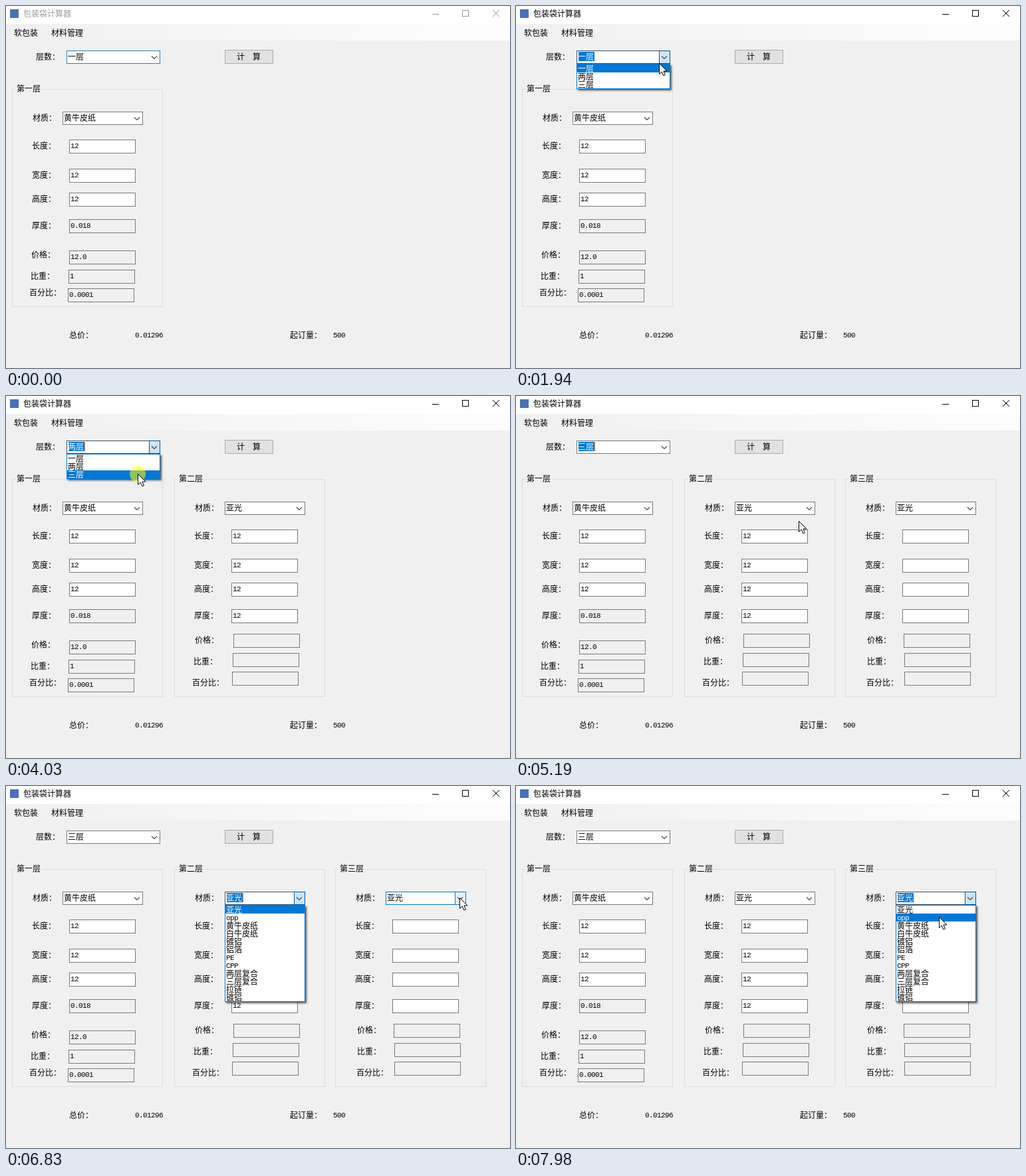
An HTML page with a canvas for the animation above (8000 ms loop, 758 by 545 pixels).

```html
<!DOCTYPE html>
<html lang="zh-CN">
<head>
<meta charset="utf-8">
<title>包装袋计算器</title>
<style>
html, body { margin: 0; width: 100%; height: 100%; overflow: hidden; background: #f0f0f0; }
canvas { display: block; }
</style>
</head>
<body>
<canvas id="stage" width="758" height="545"></canvas>
<script>
const ctx = document.getElementById('stage').getContext('2d');
const LOOP = 8000, SLIDE = 140, ROW = 12;
const BLUE = '#0078d7', GRAY = '#7a7a7a', FACE = '#f0f0f0';
const LAYERS = ['一层', '两层', '三层'];
const MATERIALS = ['亚光', 'opp', '黄牛皮纸', '白牛皮纸', '镀铝', '铝箔', 'PE', 'CPP',
  '两层复合', '三层复合', '拉链', '镀铝'];

// Moments of the story, in ms
const ACTIVATE = 1320, PICK_TWO = 2400, PICK_THREE = 4110, FOCUS_2 = 5570, FOCUS_3 = 7290;
const PRESSES = [[1250, 1400], [2320, 2400], [3180, 3330], [3960, 4110],
  [5570, 5720], [6880, 7060], [7290, 7340]];
const CARET_RESETS = [ACTIVATE, PICK_TWO, 3960, FOCUS_2, FOCUS_3];

const layerCombo = { x: 91, y: 67, w: 141, items: LAYERS, opens: [[1400, PICK_TWO], [3250, PICK_THREE]],
  focus: [ACTIVATE, FOCUS_2],
  value: t => LAYERS[t < PICK_TWO ? 0 : t < PICK_THREE ? 1 : 2] };
const materialCombo = (x, value, opens = [], focus = [LOOP, LOOP]) =>
  ({ x, y: 159, w: 121, items: MATERIALS, opens, focus, value: () => value });

const groups = [
  { x: 9, title: '第一层', from: 0, combo: materialCombo(85, '黄牛皮纸'),
    values: ['12', '12', '12', '0.018'], locked: true,
    results: [['价格', 38, 374, 95, 368, '12.0'], ['比重', 37, 406, 94, 397, '1'], ['百分比', 35, 431, 93, 425, '0.0001']] },
  { x: 253, title: '第二层', from: PICK_TWO, combo: materialCombo(329, '亚光', [[5650, 6900]], [FOCUS_2, FOCUS_3]),
    values: ['12', '12', '12', '12'],
    results: [['价格', 284, 367, 342, 358, ''], ['比重', 282, 399, 341, 387, ''], ['百分比', 280, 431, 340, 415, '']] },
  { x: 495, title: '第三层', from: PICK_THREE, combo: materialCombo(571, '亚光', [[7290, LOOP]], [FOCUS_3, LOOP]),
    values: ['', '', '', ''],
    results: [['价格', 528, 367, 583, 358, ''], ['比重', 528, 399, 584, 387, ''], ['百分比', 527, 431, 584, 415, '']] }
];

// Pointer path: time, x, y
const PATH = [
  [320, 618, 515], [1080, 211, 84], [1170, 211, 84], [1250, 222, 78], [1780, 222, 78],
  [1940, 215, 86], [2170, 205, 103], [2400, 205, 103], [2630, 212, 84], [2780, 212, 84],
  [2860, 212, 82], [3010, 217, 80], [3100, 217, 80], [3180, 223, 77], [3480, 223, 77],
  [3790, 198, 117], [4150, 198, 117], [4720, 240, 150], [5300, 444, 192], [5570, 441, 175],
  [6130, 441, 175], [6860, 683, 168], [7440, 683, 168], [7980, 636, 197], [LOOP, 636, 197]
];

const within = (t, [a, b]) => t >= a && t < b;

function pointerAt(t) {
  const i = PATH.findIndex(p => p[0] > t);
  if (i < 1) return null;
  const [t0, x0, y0] = PATH[i - 1], [t1, x1, y1] = PATH[i];
  const u = (t - t0) / (t1 - t0), e = u * u * (3 - 2 * u);
  return { x: Math.round(x0 + (x1 - x0) * e), y: Math.round(y0 + (y1 - y0) * e) };
}

function fill(x, y, w, h, color) {
  ctx.fillStyle = color;
  ctx.fillRect(x, y, w, h);
}

function box(x, y, w, h, face, edge) {
  fill(x, y, w, h, edge);
  fill(x + 1, y + 1, w - 2, h - 2, face);
}

function line(color, width, ...points) {
  ctx.strokeStyle = color;
  ctx.lineWidth = width;
  ctx.beginPath();
  points.forEach(([x, y]) => ctx.lineTo(x, y));
  ctx.stroke();
}

// Text is placed by its left edge and vertical middle
function text(s, x, cy, color = '#000') {
  const latin = /^[\x20-\x7e]+$/.test(s);
  ctx.font = latin ? '11px "Liberation Mono", monospace'
    : '12px "Noto Sans CJK SC", "Noto Sans CJK", sans-serif';
  ctx.letterSpacing = latin ? '-0.6px' : '0px';
  ctx.fillStyle = color;
  ctx.fillText(s, x, cy + (latin ? 4 : 5));
}

function input(x, y, value, locked) {
  box(x, y, 100, 21, locked ? FACE : '#fff', GRAY);
  text(value, x + 2, y + 9);
}

function drawWindow(t) {
  const ink = t >= ACTIVATE ? '#000' : '#999';
  fill(0, 0, 758, 545, FACE);
  fill(0, 0, 758, 27, '#fff');
  const strip = ctx.createLinearGradient(0, 0, 758, 0);
  strip.addColorStop(0, FACE);
  strip.addColorStop(1, '#fdfdfd');
  fill(0, 27, 758, 25, strip);
  fill(6, 5, 13, 13, '#4a70bd');
  text('包装袋计算器', 26, 11, ink);
  line(ink, 1, [641, 12.5], [651, 12.5]);
  ctx.strokeRect(686.5, 6.5, 9, 9);
  line(ink, 1, [732, 6], [742, 16]);
  line(ink, 1, [742, 6], [732, 16]);
  text('软包装', 12, 40);
  text('材料管理', 68, 40);
  text('层数：', 45, 76);
  box(329, 66, 73, 21, '#e1e1e1', '#adadad');
  text('计　算', 347, 76);
  text('总价：', 95, 495);
  text('0.01296', 194, 495);
  text('起订量：', 427, 495);
  text('500', 492, 495);
}

function drawGroup(group, t, pointer) {
  const { x } = group;
  box(x, 125, 227, 328, FACE, '#dcdcdc');
  fill(x + 5, 124, 40, 3, FACE);
  text(group.title, x + 7, 124);
  text('材质：', x + 31, 168);
  ['长度', '宽度', '高度', '厚度'].forEach((label, i) => {
    const y = [201, 245, 281, 321][i];
    text(label + '：', x + 30, y + 9);
    input(x + 86, y, group.values[i], group.locked && i === 3);
  });
  for (const [label, lx, ly, bx, by, value] of group.results) {
    text(label + '：', lx, ly);
    input(bx, by, value, true);
  }
  drawCombo(group.combo, t, pointer);
}

const openSpan = (combo, t) => combo.opens.find(span => within(t, span));
const over = (c, p) => p && p.x >= c.x && p.x < c.x + c.w && p.y >= c.y && p.y < c.y + 20;

function drawCombo(combo, t, pointer) {
  const { x, y, w } = combo, value = combo.value(t);
  const open = openSpan(combo, t), hover = over(combo, pointer) && t >= ACTIVATE;
  const leaving = t < 70 && combo === layerCombo || within(t, [combo.focus[1], combo.focus[1] + 200]);
  box(x, y, w, 20, '#fff', open ? '#40505f' : hover ? BLUE : leaving ? '#2a7fc4' : GRAY);

  const onButton = hover && pointer.x >= x + w - 17;
  if (open || onButton) {
    const settled = open && t - open[0] >= SLIDE;
    box(x + w - 17, y, 17, 20, settled ? '#cce4f7' : '#e5f1fb', settled ? '#005499' : BLUE);
  }
  const ax = x + w - 9, ay = y + 10.5;
  line('#444', 1.1, [ax - 4, ay - 2], [ax, ay + 2], [ax + 4, ay - 2]);

  const focused = within(t, combo.focus), width = value.length * 12;
  if (focused) {
    fill(x + 3, y + 2, width, 14, BLUE);
    const base = CARET_RESETS.filter(r => r <= t).pop();
    if ((t - base) % 1060 < 530) fill(x + 3 + width, y + 2, 1, 14, '#ff8728');
  }
  text(value, x + 2, y + 9, focused ? '#fff' : '#000');
}

function drawList(combo, t, pointer) {
  const open = openSpan(combo, t);
  if (!open) return;
  const { x, w, items } = combo, top = combo.y + 20, h = items.length * ROW + 2;
  const shown = Math.min(1, (t - open[0]) / SLIDE), visible = Math.round(h * shown);
  const hoverRow = Math.floor((pointer.y - top - 1) / ROW);
  const active = shown === 1 && hoverRow >= 0 && hoverRow < items.length
    ? hoverRow : items.indexOf(combo.value(t));

  ctx.save();
  ctx.beginPath();
  ctx.rect(x, top, w + 6, visible + 6);
  ctx.clip();
  ctx.shadowColor = 'rgba(0,0,0,.65)';
  ctx.shadowBlur = 3;
  ctx.shadowOffsetX = ctx.shadowOffsetY = 2;
  fill(x, top, w, visible, shown < 1 ? '#555' : BLUE);
  ctx.shadowColor = 'transparent';
  ctx.beginPath();
  ctx.rect(x + 1, top, w - 2, Math.max(0, visible - 1));
  ctx.clip();
  ctx.translate(0, visible - h);
  fill(x + 1, top + 1, w - 2, h - 2, '#fff');
  items.forEach((item, i) => {
    const y = top + 1 + i * ROW;
    if (i === active) fill(x + 1, y, w - 2, ROW, BLUE);
    text(item, x + 2, y + 6, i === active ? '#fff' : '#000');
  });
  ctx.restore();
}

function drawPointer({ x, y }, t, combos) {
  if (PRESSES.some(span => within(t, span))) {
    ctx.fillStyle = 'rgba(255,255,0,.55)';
    ctx.beginPath();
    ctx.arc(x, y + 0.5, 12, 0, Math.PI * 2);
    ctx.fill();
  }
  const listOpen = combos.some(c => openSpan(c, t));
  if (!listOpen && combos.some(c => over(c, { x, y }) && x < c.x + c.w - 17)) {
    fill(x, y - 7, 1, 14, '#000');
    for (const dy of [-8, 7]) {
      fill(x - 3, y + dy, 3, 1, '#000');
      fill(x + 1, y + dy, 3, 1, '#000');
    }
    return;
  }
  ctx.save();
  ctx.translate(x + 0.5, y + 0.5);
  const arrow = new Path2D('M0 0V16L3.7 12.5L6.3 18.4L8.9 17.3L6.4 11.5H11.5Z');
  ctx.fillStyle = '#fff';
  ctx.fill(arrow);
  ctx.strokeStyle = '#000';
  ctx.lineWidth = 1;
  ctx.stroke(arrow);
  ctx.restore();
}

function render(now) {
  const t = now % LOOP, pointer = pointerAt(t);
  const visible = groups.filter(g => t >= g.from);
  const combos = [layerCombo, ...visible.map(g => g.combo)];
  drawWindow(t);
  drawCombo(layerCombo, t, pointer);
  visible.forEach(g => drawGroup(g, t, pointer));
  combos.forEach(c => drawList(c, t, pointer));
  if (pointer) drawPointer(pointer, t, combos);
  requestAnimationFrame(render);
}
requestAnimationFrame(render);
</script>
</body>
</html>
```
